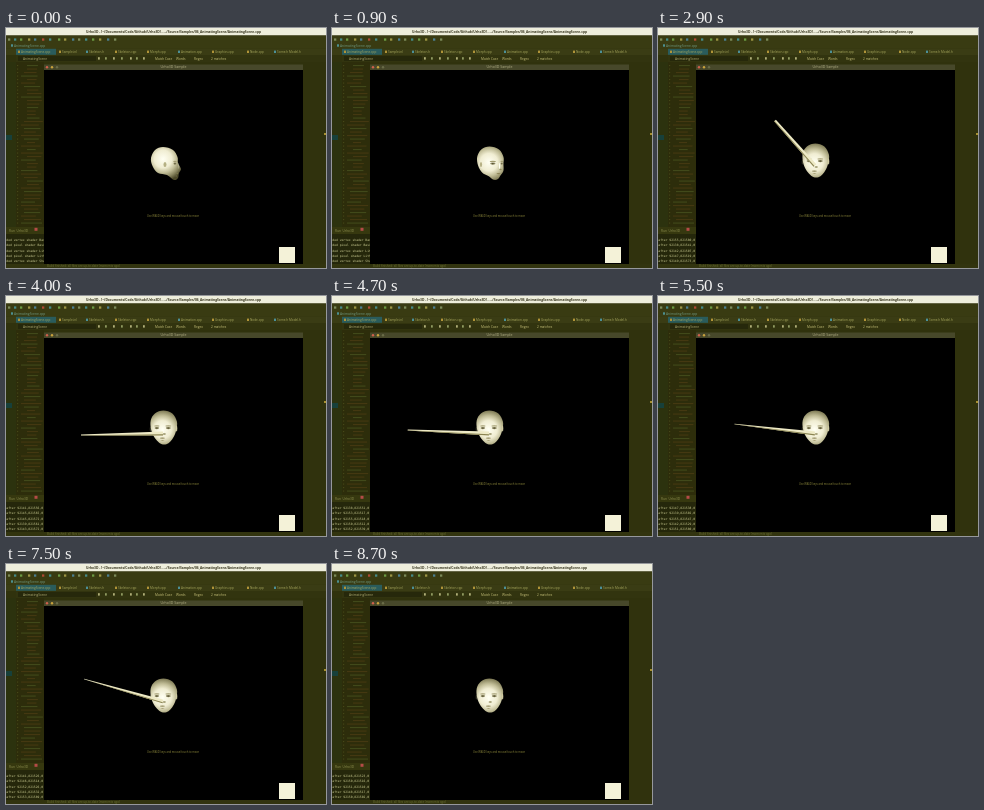
An HTML page for the animation above (8.8 s loop, 320x240 px).

```html
<!DOCTYPE html>
<html lang="en">
<head>
<meta charset="utf-8">
<style>
  html, body { margin: 0; width: 100%; height: 100%; overflow: hidden; background: #000; }
  svg { display: block; width: 100vw; height: 100vh; }
  text { font-family: "Open Sans", "DejaVu Sans", sans-serif; white-space: pre; }
  .mono { font-family: "DejaVu Sans Mono", monospace; }
</style>
</head>
<body>
<svg id="stage" viewBox="0 0 320 240">
  <defs>
    <radialGradient id="skin" gradientUnits="userSpaceOnUse" cx="157" cy="137" r="22">
      <stop offset="0" stop-color="#fffff2"/>
      <stop offset=".4" stop-color="#f0edd2"/>
      <stop offset=".62" stop-color="#c2be98"/>
      <stop offset=".82" stop-color="#8a8660"/>
      <stop offset="1" stop-color="#4a4728"/>
    </radialGradient>
    <clipPath id="console"><rect y="206" width="38" height="34"/></clipPath>
  </defs>
  <rect width="320" height="240" fill="#30320d"/>
  <g id="ide"></g>
  <g id="log" clip-path="url(#console)"></g>
  <g id="window"></g>
  <g id="head">
    <path id="skull" fill="url(#skin)"/>
    <g id="features"></g>
  </g>
  <path id="nose" fill="#eeeac6"/>
  <path id="noseShade" fill="#8a8452"/>
</svg>
<script>
const LOOP = 8800, STEP = 100;
const $ = id => document.getElementById(id);

function add(parent, tag, attrs, content) {
  const el = document.createElementNS("http://www.w3.org/2000/svg", tag);
  for (const key in attrs) el.setAttribute(key, attrs[key]);
  if (content) el.textContent = content;
  return $(parent).appendChild(el);
}
const rect = (parent, x, y, width, height, fill) => add(parent, "rect", { x, y, width, height, fill });
const label = (parent, x, y, size, fill, str, extra) =>
  add(parent, "text", { x, y, "font-size": size, fill, ...extra }, str);

const lerp = (a, b, k) => a + (b - a) * k;
const ease = k => k * k * (3 - 2 * k);
const clamp = k => Math.max(0, Math.min(1, k));
const noise = n => {
  const v = Math.sin(n * 127.1 + 11.7) * 43758.5453;
  return v - Math.floor(v);
};

function drawIde() {
  const ink = "#8f9050";
  rect("ide", 0, 0, 320, 7.5, "#eeeedc");
  label("ide", 167.5, 5, 3.27, "#35331c",
    "Urho3D - [~/Documents/Code/Github/Urho3D] - .../Source/Samples/06_AnimatingScene/AnimatingScene.cpp",
    { "text-anchor": "middle", "font-weight": 700 });

  // toolbar and breadcrumb
  rect("ide", 0, 7.5, 320, 13, "#393b12");
  const tints = ["#7c8a5a", "#468a88", "#6c9a44", "#9c9444", "#4c7f90"];
  [2, 8, 14, 22, 28, 36, 43, 52, 58, 66, 72, 79, 86, 93, 101, 108].forEach((x, i) =>
    rect("ide", x, 10.4, 2.3, 2.3, i === 5 ? "#b04a34" : tints[i % 5]));
  rect("ide", 5, 16.3, 2, 2.4, "#4c8f90");
  label("ide", 8, 18.7, 3.3, "#6f9a84", "AnimatingScene.cpp");

  // tabs and find bar
  rect("ide", 0, 20.5, 320, 6.5, "#3a3c14");
  rect("ide", 10, 20.8, 40, 6, "#2a5c5c");
  [[15, "AnimatingScene.cpp"], [56, "Sample.inl"], [83, "Skeleton.h"], [112, "Skeleton.cpp"],
   [144, "Morph.cpp"], [175, "Animation.cpp"], [209, "Graphics.cpp"], [244, "Node.cpp"], [271, "Scene.h Model.h"]]
    .forEach(([x, str], i) => {
      rect("ide", x - 3, 22.6, 2, 2.4, i % 3 === 2 ? "#4c9098" : "#b09438");
      label("ide", x, 25, 3.1, "#a8a85e", str);
    });
  rect("ide", 10, 27, 310, 7, "#32340f");
  rect("ide", 12, 28, 78, 5, "#26280b");
  label("ide", 17, 31.7, 3.2, "#b3b077", "AnimatingScene");
  [92, 99, 107, 115, 124, 130, 137].forEach((x, i) => rect("ide", x, 29.2, 1.8, 2.4, i % 2 ? "#8f9a60" : "#b0ae78"));
  [[149, "Match Case"], [170, "Words"], [188, "Regex"], [205, "2 matches"]]
    .forEach(([x, str]) => label("ide", x, 31.7, 3.2, "#c8c27a", str));

  // project strip and editor
  rect("ide", 0, 34, 10, 165, "#2c320e");
  rect("ide", 0, 107, 6, 5, "#17403a");
  rect("ide", 10, 34, 28, 165, "#2d2d0b");
  for (let i = 0; i < 46; i++) {
    const y = 37 + i * 3.5;
    const indent = 15 + Math.floor(noise(i) * 3) * 3;
    rect("ide", indent, y, 37 - indent - noise(i + 90) * 8, 1.1, i % 3 ? "#443811" : "#41491a");
    rect("ide", 11, y, 1.2, 1.1, "#454818");
  }
  rect("ide", 318, 105, 2, 2, "#a89030");
  rect("ide", 0, 199, 38, 7, "#36380f");
  label("ide", 3, 203.5, 3.2, ink, "Run  Urho3D");
  rect("ide", 28.5, 199.8, 3, 3, "#b54b48");
  rect("ide", 0, 206, 38, 30, "#25270b");
  rect("ide", 0, 236, 320, 4, "#32340f");
  label("ide", 41, 239.2, 3, "#6c7034", "Build finished: all files are up-to-date (moments ago)");
}

function drawWindow() {
  rect("window", 38, 36.5, 259, 5.5, "#47482a");
  rect("window", 38, 42, 259, 194, "#000");
  ["#d0604c", "#c9a23c", "#6a6c48"].forEach((fill, i) =>
    add("window", "circle", { cx: 41 + i * 5, cy: 39.2, r: 1.2, fill }));
  label("window", 167.5, 40.4, 3.5, "#b5b288", "Urho3D Sample", { "text-anchor": "middle" });
  label("window", 167, 188.5, 2.65, "#8f8a3c", "Use WASD keys and mouse/touch to move",
    { "text-anchor": "middle" });
  rect("window", 273, 219, 16, 16, "#f4f2d8");
}

const profile = [[157,119],[167,122],[171.5,129],[172,135],[175,141],[173,145],[172,150],
  [168,152],[161,147],[152,145],[146.5,138],[145,130],[149,122]];
const front = [[158,118],[167,121],[171.5,129],[171,137],[168.5,144],[165,149],[161,151.7],
  [156.5,151.7],[152.5,149],[148.5,144],[145.7,137],[145.3,128],[149.5,121]];

// closed Catmull-Rom curve
function smooth(points) {
  const n = points.length, at = i => points[(i + n) % n];
  let d = "M" + points[0];
  for (let i = 0; i < n; i++) {
    const [a, b, c, e] = [at(i - 1), at(i), at(i + 1), at(i + 2)];
    d += `C${b[0] + (c[0] - a[0]) / 6},${b[1] + (c[1] - a[1]) / 6} ` +
         `${c[0] - (e[0] - b[0]) / 6},${c[1] - (e[1] - b[1]) / 6} ${c}`;
  }
  return d + "Z";
}

// angle round the head, height, radii, distance from axis, colour
const marks = [
  [-.48, 133.4, 3.3, .6, 12.5, "#a39d72"], [.48, 133.4, 3.3, .6, 12.5, "#a39d72"],
  [-.48, 135.6, 2.7, 1.1, 12.5, "#8a8560"], [.48, 135.6, 2.7, 1.1, 12.5, "#8a8560"],
  [-.48, 135.6, 1, .6, 12.5, "#55512f"], [.48, 135.6, 1, .6, 12.5, "#55512f"],
  [.04, 138, .8, 3.3, 14, "#fffff2"], [.14, 141.5, 1.7, .7, 14, "#8e885a"],
  [0, 145.6, 2.6, .6, 13, "#8d8558"], [0, 148, 2, .4, 12, "#a9a276"],
  [-1.45, 136.5, 1.5, 2.6, 13.4, "#b5b083"], [1.4, 136, 1.9, 3, 13.4, "#d2cda4"]
];

// time, tip x, tip y, tip width
const base = [157, 137.5];
const tips = [
  [1900, 157, 137.5, 2], [2900, 117, 92.5, 2.4], [4000, 75, 139, 1.2],
  [5500, 76.5, 128, .5], [7500, 78, 115, .7], [8500, 157, 137.5, .7]
];

function tipAt(t) {
  const i = tips.findIndex((key, n) => n && t < key[0]);
  if (i < 0 || t <= tips[0][0]) return null;
  const [a, b] = [tips[i - 1], tips[i]];
  const k = ease((t - a[0]) / (b[0] - a[0]));
  return [1, 2, 3].map(n => lerp(a[n], b[n], k));
}

function drawNose(t) {
  const tip = tipAt(t);
  let body = "", shade = "";
  if (tip) {
    const dx = tip[0] - base[0], dy = tip[1] - base[1], len = Math.hypot(dx, dy) || 1;
    const nx = -dy / len, ny = dx / len;
    const at = (p, off) => `${p[0] + nx * off},${p[1] + ny * off}`;
    const root = Math.min(1.9, len / 8), end = tip[2] / 2;
    const strip = (lo, hi) =>
      `M${at(base, lo * root)}L${at(tip, lo * end)} ${at(tip, hi * end)} ${at(base, hi * root)}Z`;
    body = strip(-1, 1);
    shade = strip(-1, -.4);
  }
  $("nose").setAttribute("d", body);
  $("noseShade").setAttribute("d", shade);
}

function drawHead(t) {
  const turn = 1 - ease(clamp(t / 1700));
  const lift = ease(clamp((t - 1900) / 1000)), rise = ease(clamp((t - 2900) / 1000));
  const yaw = turn * 1.5 - lift * .1;
  $("head").setAttribute("transform", `translate(${-.6 * lift},${-2.5 * lift - rise})`);
  $("skin").setAttribute("cy", lerp(137, 131, turn));
  $("skull").setAttribute("d", smooth(front.map((p, i) => p.map((v, n) => lerp(v, profile[i][n], turn)))));
  marks.forEach(([a, y, rx, ry, r], i) => {
    const c = Math.cos(a + yaw), el = features[i];
    el.setAttribute("cx", 158.3 + r * Math.sin(a + yaw));
    el.setAttribute("cy", y);
    el.setAttribute("rx", Math.max(.35, Math.abs(c)) * rx);
    el.setAttribute("ry", ry);
    el.setAttribute("opacity", clamp(c * 4 + .3));
  });
}

const loading = ["ded vertex shader Bas", "ded pixel shader Basi", "ded vertex shader Lit",
  "ded pixel shader LitS", "ded vertex shader Sha"];

function drawLog(t) {
  const printing = t >= 1900, top = Math.floor(t / STEP);
  rows.forEach((row, i) => {
    const n = 92136 + Math.floor(noise(top + i) * 20);
    row.textContent = printing ? `after ${n},${821500 + Math.floor(noise(top + i + 50) * 90)},0` : loading[i];
    row.setAttribute("y", 213 + i * 5.3);
  });
}

drawIde();
drawWindow();
const features = marks.map(m => add("features", "ellipse", { fill: m[5] }));
const rows = loading.map(() => label("log", .3, 0, 3.05, "#cfd095", " ", { class: "mono" }));

function render(t) {
  drawHead(t);
  drawNose(t);
  drawLog(t);
}

const start = performance.now();
function tick() {
  const t = (performance.now() - start) % LOOP;
  render(Math.floor(t / STEP) * STEP);
  requestAnimationFrame(tick);
}
render(0);
requestAnimationFrame(tick);
</script>
</body>
</html>
```
